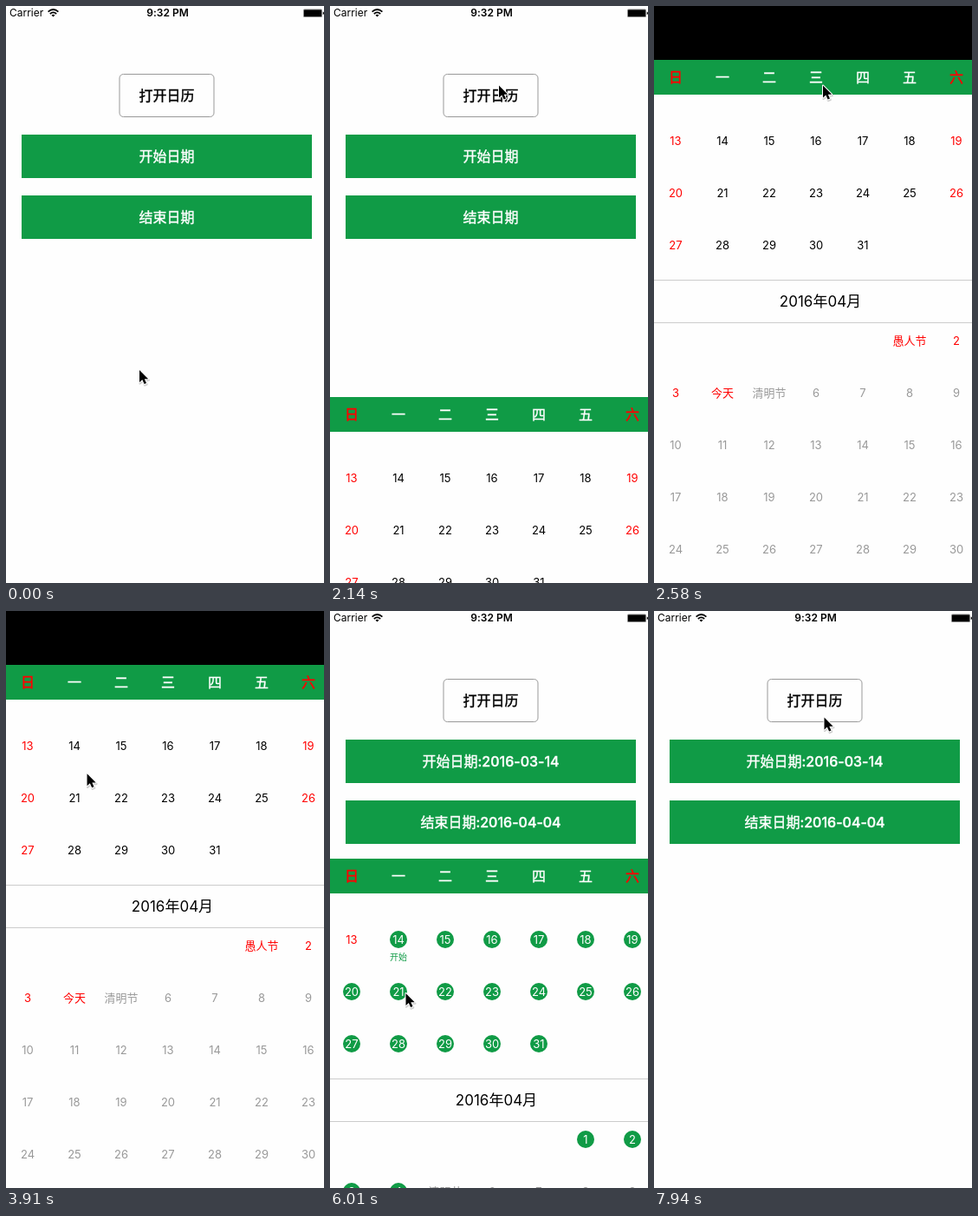
Recreate the animation shown at these times as an HTML page. Size 367 px wide and 664 px high, loop 8000 ms.

```html
<!DOCTYPE html>
<html lang="zh-CN">
<head>
<meta charset="utf-8">
<title>日历</title>
<style>
  html, body { margin: 0; width: 100%; height: 100%; overflow: hidden; background: #fefefe; }
  svg { display: block; width: 100%; height: 100%; }
  text {
    font-family: Inter, "Noto Sans CJK SC", "Noto Sans CJK", sans-serif;
    font-feature-settings: "calt" 0;
    text-anchor: middle;
  }
</style>
</head>
<body>
<svg id="stage" viewBox="0 0 367 664" xmlns="http://www.w3.org/2000/svg">
  <rect width="367" height="664" fill="#fefefe"/>
  <g id="page">
    <text x="4" y="12.4" font-size="12" style="text-anchor:start">Carrier</text>
    <g fill="none" stroke="#000" stroke-width="1.7">
      <path d="M48.6 6.6Q54.5 1.4 60.4 6.6"/>
      <path d="M50.8 9Q54.5 5.8 58.2 9"/>
    </g>
    <path d="M52.5 10.4Q54.5 8.9 56.5 10.4L54.5 12.5Z"/>
    <text x="186.5" y="12.4" font-size="12" font-weight="600">9:32 PM</text>
    <rect x="343" y="3.5" width="22" height="9.5" rx="1.5" fill="#888"/>
    <rect x="344" y="4.5" width="20" height="7.5" rx=".6"/>
    <path d="M365.7 6.5Q367 6.7 367 8.2T365.7 10Z"/>
    <rect x="131" y="78.5" width="109" height="49" rx="4.5" fill="#fefefe" stroke="#999"/>
  </g>
  <g id="sheet"></g>
  <rect id="bar" width="367" height="62"/>
  <g id="cursor">
    <path d="M0 0V14L3.3 11L5.6 16L8 15L5.8 10.2H10.2Z" transform="translate(.6 1.4)"
      fill="#000" stroke="#000" stroke-width="2.4" stroke-linejoin="round" opacity=".18"/>
    <path d="M0 0V14L3.3 11L5.6 16L8 15L5.8 10.2H10.2Z"
      fill="#000" stroke="#fff" stroke-width="2" stroke-linejoin="round" paint-order="stroke"/>
  </g>
</svg>
<script>
const GREEN = '#109b46', RED = '#f00', GRAY = '#999';
const LOOP = 8000, LEAD = 500, TICK = 148.8;
const HEIGHT = 664, OPEN_AT = 2058, CLOSE_AT = 5939;
const OPENED = 14, PICK_START = 26, PICK_END = 36, CLOSING = 37;
// Days are numbered from 1 March
const START_DAY = 14, END_DAY = 35;

const byId = id => document.getElementById(id);
const page = byId('page'), sheet = byId('sheet'), bar = byId('bar'), cursor = byId('cursor');

function add(parent, tag, attrs, content) {
  const el = document.createElementNS('http://www.w3.org/2000/svg', tag);
  for (const key in attrs) el.setAttribute(key, attrs[key]);
  if (content) el.textContent = content;
  parent.appendChild(el);
  return el;
}

// Text centred on (x, y)
function label(parent, x, y, size, fill, content) {
  return add(parent, 'text', { x, y: y + size * 0.365, 'font-size': size, fill }, content);
}

// A thin stroke stands in for a medium weight of the Chinese font
function mediumLabel(parent, x, y, fill, content) {
  const el = label(parent, x, y, 16, fill, content);
  el.setAttribute('font-weight', 500);
  el.setAttribute('stroke', fill);
  el.setAttribute('stroke-width', 0.4);
  return el;
}

function show(el, on) {
  el.setAttribute('visibility', on ? 'visible' : 'hidden');
}

function field(y) {
  add(page, 'rect', { x: 18, y, width: 335, height: 50, fill: GREEN });
  return mediumLabel(page, 185.5, y + 24.8, '#fff', '');
}

const columnX = col => 25 + 54 * col;

// One calendar day; slot counts cells from the Sunday of the first row
function makeDay(order, slot, top, number, name, color) {
  const x = columnX(slot % 7), y = top + 60 * Math.floor(slot / 7);
  const disc = add(sheet, 'circle', { cx: x, cy: y, r: 10, fill: GREEN });
  const text = label(sheet, x, y, 13, color, name);
  const caption = order === START_DAY ? '开始' : order === END_DAY ? '结束' : '';
  const note = caption && label(sheet, x, y + 20, 10, GREEN, caption);
  return { order, disc, text, note, number, name, color };
}

mediumLabel(page, 185.5, 102.8, '#000', '打开日历');
const startField = field(148), endField = field(218);

add(sheet, 'rect', { y: 62, width: 367, height: 620, fill: '#fefefe' });
add(sheet, 'rect', { y: 62, width: 367, height: 40, fill: GREEN });
[...'日一二三四五六'].forEach((name, col) =>
  mediumLabel(sheet, columnX(col), 82, col % 6 ? '#fff' : RED, name));
for (const y of [315.5, 364.5])
  add(sheet, 'path', { d: `M0 ${y}H367`, stroke: '#ccc' });
label(sheet, 192, 340, 17, '#000', '2016年04月');

const days = [], festivals = { 1: '愚人节', 4: '今天', 5: '清明节' };
for (let d = 13; d <= 31; d++) {
  const weekend = (d - 13) % 7 % 6 === 0;
  days.push(makeDay(d, d - 13, 155, d, d, weekend ? RED : '#000'));
}
for (let d = 1; d <= 30; d++)
  days.push(makeDay(d + 31, d + 4, 385, d, festivals[d] || d, d <= 4 ? RED : GRAY));

// Pointer moves: first tick, last tick, end point
const home = [154, 419];
const moves = [
  [-1, 5, 209, 182],
  [5, 6, 209, 145],
  [7, 10, 195, 91.5],
  [14, 19, 150, 380],
  [19, 24, 87, 165],
  [26, 32, 137, 462.5],
  [32, 35, 87.5, 440],
  [37, 40, 178, 525],
  [40, 43, 189, 359],
  [45, 47, 197, 233],
  [49, 50, 196.5, 122.5]
];

const clamp = p => Math.min(1, Math.max(0, p));
const ease = p => p * p * (3 - 2 * p);

function pointerAt(tick) {
  let [x, y] = home;
  for (const [from, to, endX, endY] of moves) {
    const p = ease(clamp((tick - from) / (to - from)));
    x += (endX - x) * p;
    y += (endY - y) * p;
  }
  return `${x} ${y}`;
}

// Share of the slide still to go in a critically damped spring
function remaining(ms) {
  const x = Math.max(0, ms) * 0.018;
  return (1 + x) * Math.exp(-x);
}

function sheetOffset(tick, time) {
  if (tick < OPENED) return HEIGHT * remaining(time - OPEN_AT);
  if (tick < CLOSING) return 0;
  return HEIGHT * (1 - remaining(time - CLOSE_AT));
}

function render(now) {
  // The screen refreshes in ticks after a short lead-in
  const t = now % LOOP;
  const tick = t < LEAD ? -1 : Math.floor((t - LEAD) / TICK + 0.1);
  const offset = Math.floor(sheetOffset(tick, LEAD + tick * TICK));
  sheet.setAttribute('transform', `translate(0 ${offset})`);
  show(bar, tick >= OPENED && tick < CLOSING);

  const done = tick >= CLOSING;
  startField.textContent = '开始日期' + (done ? ':2016-03-14' : '');
  endField.textContent = '结束日期' + (done ? ':2016-04-04' : '');

  const last = tick >= PICK_END ? END_DAY : tick >= PICK_START ? START_DAY : 0;
  for (const day of days) {
    const on = day.order >= START_DAY && day.order <= last;
    show(day.disc, on);
    if (day.note) show(day.note, on);
    day.text.textContent = on ? day.number : day.name;
    day.text.setAttribute('fill', on ? '#fff' : day.color);
  }

  cursor.setAttribute('transform', `translate(${pointerAt(tick)})`);
}

const began = performance.now();
function loop() {
  render(performance.now() - began);
  requestAnimationFrame(loop);
}
loop();
</script>
</body>
</html>
```
